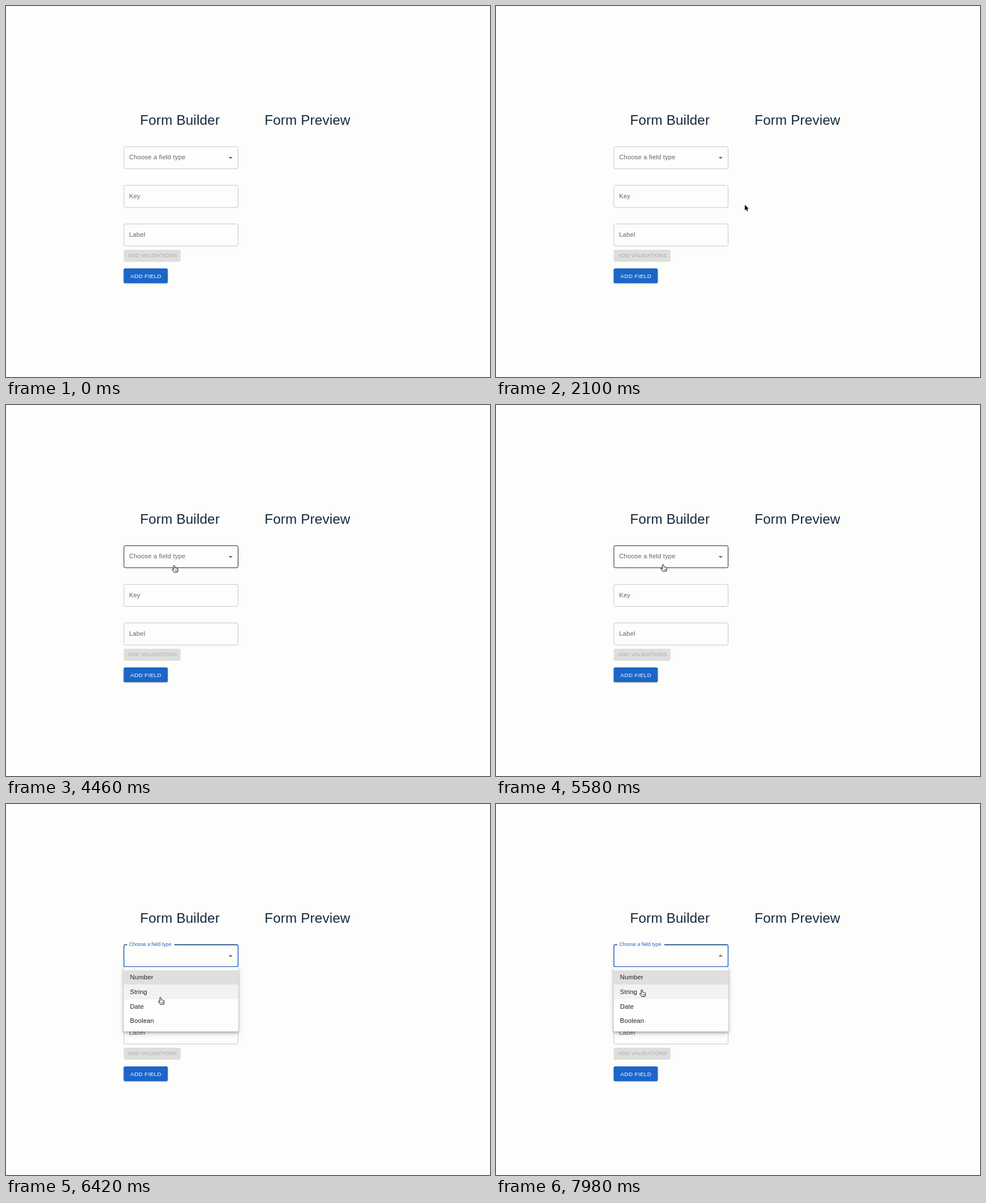
Animation, 854 px wide and 656 px high, one loop 8 s. Source, as an HTML page:

```html
<!DOCTYPE html>
<html lang="en">
<head>
<meta charset="utf-8">
<title>Form Builder</title>
<style>
html, body { margin: 0; width: 100%; height: 100%; overflow: hidden; background: #fdfdfc; }
svg { display: block; width: 854px; height: 656px; }
text { font-family: "Liberation Sans", Arial, sans-serif; font-size: 11.39px; letter-spacing: .107px; fill: #666; }
.title { font-size: 24.2px; letter-spacing: .178px; fill: #14293a; }
.item { fill: #222; }
.box { fill: none; stroke: #c6c6c6; }
#paper { fill: #fdfdfc; filter: drop-shadow(0 2px 2px rgba(0,0,0,.25)) drop-shadow(0 3px 5px rgba(0,0,0,.18)); }
#add { fill: #1c66c9; filter: drop-shadow(0 1px 1px rgba(0,0,0,.3)); }
</style>
</head>
<body>
<svg viewBox="0 0 854 656">
  <rect width="854" height="656" fill="#fdfdfc"/>
  <text class="title" x="236.6" y="210">Form Builder</text>
  <text class="title" x="456.2" y="210">Form Preview</text>

  <path id="outline" fill="none"/>
  <path id="topLine" fill="none" stroke="#24507f" stroke-width="1.4"/>
  <path id="caret" d="M-3.6 -1.4H3.6L0 2.1Z" fill="#666"/>
  <text id="label">Choose a field type</text>

  <rect class="box" x="208" y="317.2" width="201.5" height="39" rx="2.6"/>
  <text x="217.2" y="339.7">Key</text>
  <rect class="box" x="208" y="385.4" width="201.5" height="39" rx="2.6"/>
  <text x="217.2" y="408">Label</text>

  <rect x="207.6" y="431" width="100.4" height="21.3" rx="2.8" fill="#dededd"/>
  <text x="215" y="444.2" style="font-size:9.25px;letter-spacing:.33px;fill:#a9a9a9">ADD VALIDATIONS</text>
  <rect id="add" x="207.6" y="464" width="77.8" height="26" rx="2.8"/>
  <text x="219.6" y="480.5" style="font-size:9.96px;letter-spacing:.285px;fill:#fff">ADD FIELD</text>

  <g id="menu">
    <rect id="paper" x="207.6" y="288.3" width="202.4" height="113.9" rx="2.8"/>
    <g id="rows"></g>
  </g>

  <g id="arrow">
    <path d="M0 0V9.8L2.3 7.7 3.9 11.3 5.6 10.5 4 7H6.9Z" stroke="#fff" stroke-width="1.4" paint-order="stroke" stroke-linejoin="round"/>
  </g>
  <g id="hand">
    <path d="M-1 1.2Q-1 -.3 .2 -.3Q1.4 -.3 1.4 1L1.8 4.2Q2.8 3.6 3.6 4.5Q4.8 4 5.4 5Q6.9 4.7 6.9 6.4V8.5L5.9 11.8H-.2Q-1 9.8 -3.4 7.5Q-3.8 6.2 -2.5 6.2L-.6 7.4Z" fill="#fff" stroke="#111" stroke-linejoin="round"/>
    <path d="M2 7.4V10M3.7 7.4V10M5.2 7.4V10" stroke="#333" stroke-width=".7"/>
  </g>
</svg>
<script>
const LOOP = 8000, CLICK = 5640, ENTER = 1050;
const ROW_TOP = 294, ROW_H = 25.6;
const $ = id => document.getElementById(id);
const clamp = v => Math.max(0, Math.min(1, v));
const easeOut = p => 1 - (1 - p) ** 2;
const set = (el, attrs) => { for (const k in attrs) el.setAttribute(k, attrs[k]); };

// Pointer path: time, x, y
const path = [
  [1050, -10, 430], [1160, 130, 427], [1280, 390, 415], [1380, 503, 406],
  [1520, 528, 399], [1700, 530, 396], [2000, 470, 366], [2300, 370, 321],
  [2560, 305, 296], [2820, 292.5, 291], [3300, 293, 291], [3600, 296.5, 285],
  [4460, 296.5, 284], [5100, 296, 280], [5650, 294, 283], [5900, 289.3, 307.7],
  [6300, 276, 334], [6650, 266, 353], [6900, 262, 350], [7000, 260, 340.2],
  [7150, 258.5, 333], [7400, 257.5, 330], [7980, 257, 328.8]
];

// Slope that flattens at turning points, so the curve never overshoots
function slope(i, axis) {
  const a = path[i - 1], b = path[i], c = path[i + 1];
  if (!a || !c) return 0;
  const l = (b[axis] - a[axis]) / (b[0] - a[0]);
  const r = (c[axis] - b[axis]) / (c[0] - b[0]);
  return l * r <= 0 ? 0 : 2 * l * r / (l + r);
}

function pointer(t, axis) {
  if (t <= path[0][0]) return path[0][axis];
  const i = path.findIndex(p => p[0] >= t);
  if (i < 0) return path[path.length - 1][axis];
  const a = path[i - 1], b = path[i], d = b[0] - a[0], u = (t - a[0]) / d, v = 1 - u;
  return v * v * (1 + 2 * u) * a[axis] + u * u * (3 - 2 * u) * b[axis]
    + d * u * v * (v * slope(i - 1, axis) - u * slope(i, axis));
}

const svgNS = "http://www.w3.org/2000/svg";
const rows = ["Number", "String", "Date", "Boolean"].map((name, i) => {
  const y = ROW_TOP + i * ROW_H;
  const bg = document.createElementNS(svgNS, "rect");
  const text = document.createElementNS(svgNS, "text");
  set(bg, { x: 207.6, y, width: 202.4, height: ROW_H });
  set(text, { class: "item", x: 218.7, y: y + 16.4 });
  text.textContent = name;
  $("rows").append(bg, text);
  return bg;
});

function drawField(t, hover) {
  const open = t >= CLICK, p = easeOut(clamp((t - CLICK) / 200));
  const gap = 213.5 + 83.5 * clamp((t - CLICK) / 100);
  const start = open ? `M${gap} 248.8` : "M211 248.8";
  const end = open ? "H213.5" : "Z";
  set($("outline"), {
    d: start + "H407Q409.5 248.8 409.5 251.4V285.2Q409.5 287.8 407 287.8H210.6Q208 287.8 208 285.2V251.4Q208 248.8 210.6 248.8" + end,
    stroke: open ? "#1c66c9" : hover ? "#222" : "#c6c6c6",
    "stroke-width": open ? 1.5 : 1
  });
  set($("topLine"), { d: open ? `M${gap} 248.8H407M210.6 248.8H213.5` : "" });
  set($("caret"), { transform: `translate(396.3 268.3)${open ? " rotate(180)" : ""}` });
  set($("label"), {
    transform: `translate(217.2 ${271.3 - 20.5 * p}) scale(${1 - .25 * p})`,
    style: open ? "fill:#1c66c9" : ""
  });
}

function drawMenu(t) {
  const since = t - CLICK - 20;
  const o = easeOut(clamp(since / 300)), s = easeOut(clamp(since / 200));
  set($("menu"), {
    opacity: o,
    transform: `translate(308.8 288.3) scale(${.75 + .25 * s} ${.5625 + .4375 * s}) translate(-308.8 -288.3)`
  });
  // The highlight trails the pointer slightly
  const over = Math.floor((pointer(t - 60, 2) - ROW_TOP) / ROW_H);
  rows.forEach((bg, i) => set(bg, { fill: i === 0 ? "#dfdfde" : i === over ? "#f2f2f1" : "none" }));
}

function draw(t) {
  const x = pointer(t, 1), y = pointer(t, 2);
  const hover = t > 3300 && y < 288, hand = hover || t >= CLICK;
  drawField(t, hover);
  drawMenu(t);
  const at = `translate(${x.toFixed(2)} ${y.toFixed(2)})`;
  set($("arrow"), { transform: at, visibility: t >= ENTER && !hand ? "visible" : "hidden" });
  set($("hand"), { transform: at, visibility: hand ? "visible" : "hidden" });
}

const begin = performance.now();
function tick() {
  draw((performance.now() - begin) % LOOP);
  requestAnimationFrame(tick);
}
tick();
</script>
</body>
</html>
```
